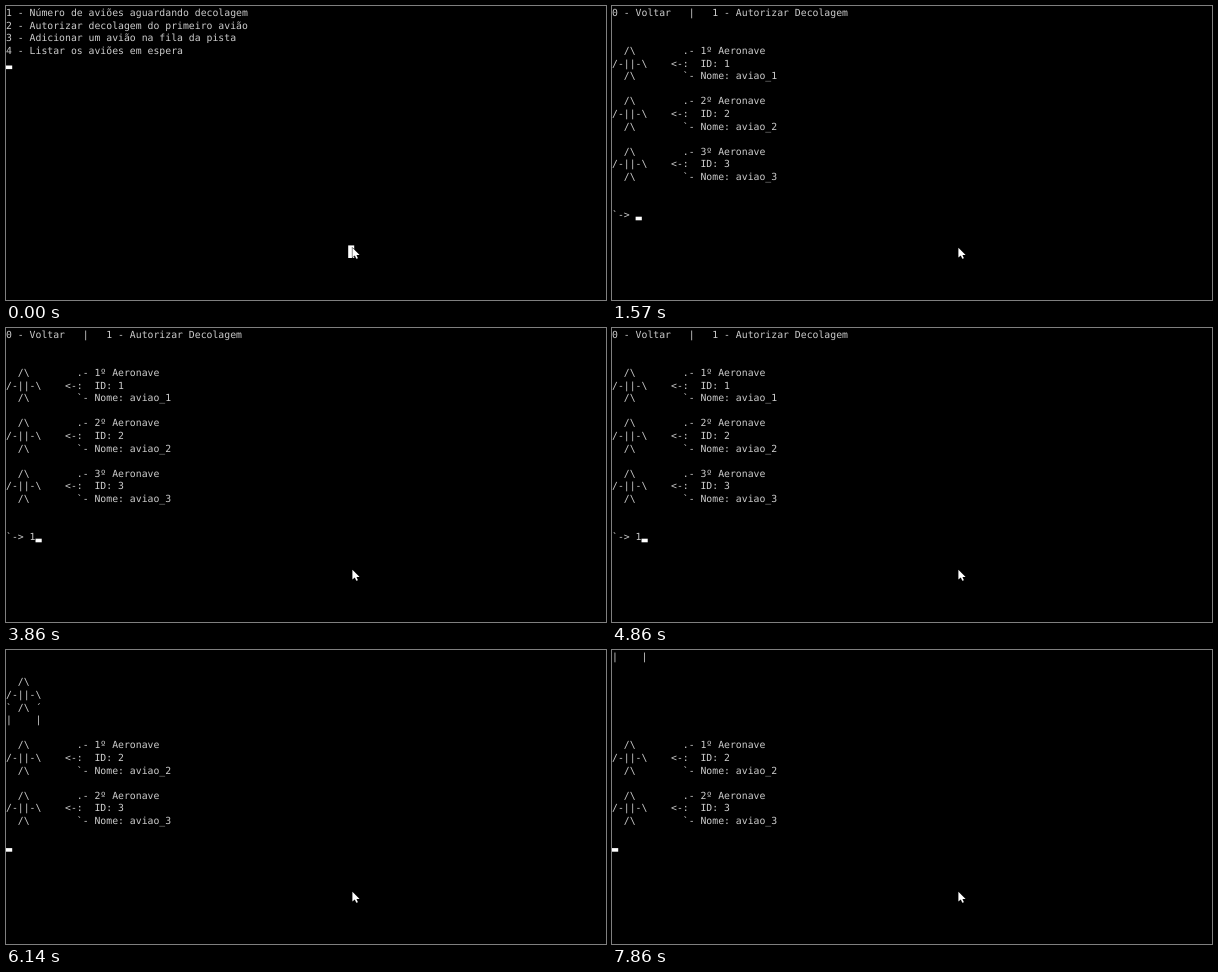
An HTML page that plays this animation: 600 by 294 pixels, repeating every 8 s.

```html
<!DOCTYPE html>
<html lang="pt">
<head>
<meta charset="utf-8">
<title>Fila de decolagem</title>
<style>
  html, body { margin: 0; width: 100%; height: 100%; overflow: hidden; background: #000; }
  svg { display: block; width: 600px; height: 294px; background: #000; }
  text {
    font: 9.807px "DejaVu Sans Mono", "Noto Sans Mono", monospace;
    fill: #ccc;
    white-space: pre;
    text-rendering: geometricPrecision;
  }
</style>
</head>
<body>
<svg viewBox="0 0 600 294">
  <g id="rows"></g>
  <rect id="cursor" width="6.2" height="3.6" fill="#fff"/>
  <rect id="selection" x="342.2" y="239.4" width="6" height="12.6" fill="#fff"/>
  <path transform="translate(346.4 241.7) scale(.6)" d="M0 0V16.5L4 13L6.5 18.5L9.2 17.4L6.8 12H12Z"
        fill="#fff" stroke="#000" stroke-width="1.6" paint-order="stroke"/>
</svg>
<script>
const LOOP = 8000, CELL = 5.904, LINE = 12.6, TOP = 0.2, ROWS = 18;
const PLANE = ["  /\\  ", "/-||-\\", "  /\\  "];
const $ = id => document.getElementById(id);

const rows = Array.from({ length: ROWS }, (_, r) => {
  const el = document.createElementNS("http://www.w3.org/2000/svg", "text");
  el.setAttribute("x", 0);
  el.setAttribute("y", TOP + r * LINE + 9.9);
  return $("rows").appendChild(el);
});

// Cursor states: [start ms, row, column]; a null row hides it.
const CURSOR = [
  [0, 4, 0], [140, null], [570, 4, 0], [860, 4, 1], [1140, null], [1430, 5, 0],
  [1570, 16, 4], [2290, null], [2710, 16, 4], [3290, null], [3860, 16, 5],
  [4290, null], [4860, 16, 5], [5290, 17, 0], [5430, 15, 0]
];
const CLIMB = [6140, 6430, 6710, 7000, 7290, 7570, 7860];

const menu = t => [
  "1 - Número de aviões aguardando decolagem",
  "2 - Autorizar decolagem do primeiro avião",
  "3 - Adicionar um avião na fila da pista",
  "4 - Listar os aviões em espera",
  t < 860 ? "" : "2"
];

function putPlane(lines, row, place, id) {
  const notes = [`      .- ${place}º Aeronave`, `    <-:  ID: ${id}`, `      \`- Nome: aviao_${id}`];
  PLANE.forEach((part, i) => { lines[row + i] = part + notes[i]; });
}

function queue(t) {
  const lines = ["0 - Voltar   |   1 - Autorizar Decolagem"];
  for (let i = 0; i < 3; i++) putPlane(lines, 3 + 4 * i, i + 1, i + 1);
  lines[16] = "`-> " + (t < 3860 ? "" : "1");
  return lines;
}

function takeoff(t) {
  const lines = [];
  const step = CLIMB.filter(start => start <= t).length;
  const nose = 3 - step;
  [PLANE[0], PLANE[1], "` /\\ ´", "|    |", "|    |"].forEach((part, i) => {
    const row = nose + i;
    if (row >= 0 && row <= 5) lines[row] = part;
  });
  for (let i = 1; i < 3; i++) putPlane(lines, 3 + 4 * i, i, i + 1);
  return lines;
}

function draw(t) {
  const screen = t < 1570 ? menu : t < 5430 ? queue : takeoff;
  const lines = screen(t);
  rows.forEach((el, r) => {
    const line = lines[r] || "";
    if (el.textContent !== line) el.textContent = line;
  });

  const [, row, col] = CURSOR.filter(state => state[0] <= t).pop();
  $("cursor").style.display = row === null ? "none" : "";
  if (row !== null) {
    $("cursor").setAttribute("x", col * CELL);
    $("cursor").setAttribute("y", TOP + (row + 1) * LINE - 3.7);
  }
  $("selection").style.display = t < 860 ? "" : "none";
}

const begin = performance.now();
function tick() {
  draw((performance.now() - begin) % LOOP);
  requestAnimationFrame(tick);
}
tick();
</script>
</body>
</html>
```
